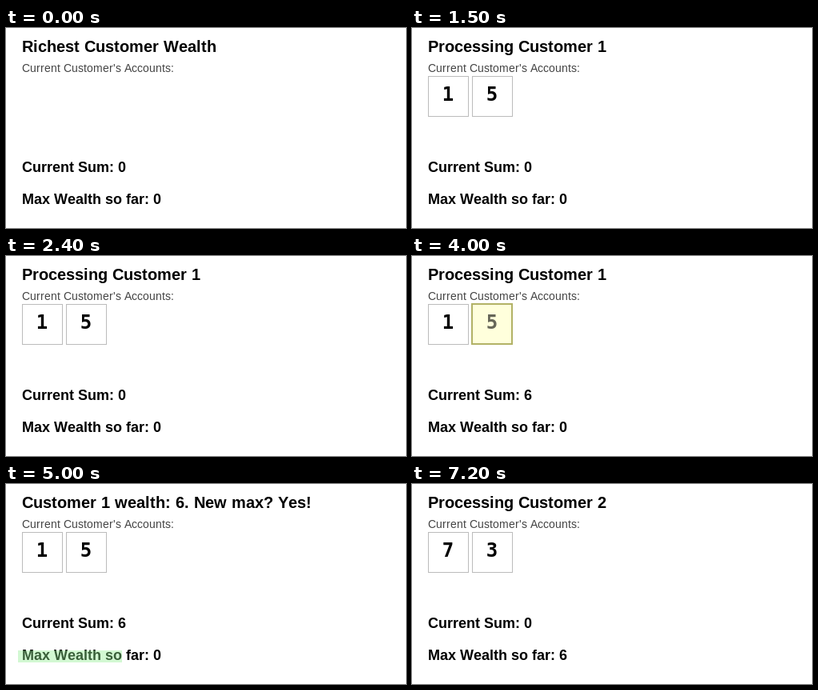
These frames come from a looping animation (500x250 px, 8 s). An HTML page with a canvas:

```html
<!DOCTYPE html>
<html lang="en">
<head>
<meta charset="utf-8">
<title>Richest Customer Wealth</title>
<style>
  html, body { margin: 0; width: 100%; height: 100%; overflow: hidden; background: #fff; }
  canvas { display: block; }
</style>
</head>
<body>
<canvas id="stage" width="500" height="250"></canvas>
<script>
const ctx = document.getElementById('stage').getContext('2d');
const LOOP = 8000;
const SANS = '"Liberation Sans", Arial, sans-serif';
const MONO = '"DejaVu Sans Mono", monospace';

const GREY = { fill: '#fff', stroke: '#aaa', ink: '#666' };
const YELLOW = { fill: '#ffffdc', stroke: '#b2b266', ink: '#666658' };

// Each step holds until the next one starts.
const steps = [
  { at: 0, title: 'Richest Customer Wealth', accounts: [], sum: 0, max: 0 },
  { at: 1500, title: 'Processing Customer 1', accounts: [1, 5], sum: 0, max: 0 },
  { at: 3000, title: 'Processing Customer 1', accounts: [1, 5], sum: 1, max: 0, active: 0, look: GREY },
  { at: 4000, title: 'Processing Customer 1', accounts: [1, 5], sum: 6, max: 0, active: 1, look: YELLOW },
  { at: 5000, title: 'Customer 1 wealth: 6. New max? Yes!', accounts: [1, 5], sum: 6, max: 0, newMax: true },
  { at: 6000, title: 'Processing Customer 2', accounts: [7, 3], sum: 0, max: 6 }
];

// Sets text on whole-pixel advances.
function write(text, y, font, color = '#000') {
  ctx.font = `${font} ${SANS}`;
  ctx.fillStyle = color;
  ctx.textAlign = 'left';
  let x = 20;
  for (const ch of text) {
    ctx.fillText(ch, x, y);
    x += Math.round(ctx.measureText(ch).width);
  }
}

function drawAccount(value, index, look) {
  const x = 20 + index * 55, y = 60;
  const offset = look ? 0 : 0.5;
  if (look) {
    ctx.fillStyle = look.fill;
    ctx.fillRect(x, y, 50, 50);
  }
  ctx.lineWidth = look ? 2 : 1;
  ctx.strokeStyle = look ? look.stroke : '#bbb';
  ctx.strokeRect(x + offset, y + offset, 50, 50);

  ctx.font = `bold 24px ${MONO}`;
  ctx.fillStyle = look ? look.ink : '#000';
  ctx.textAlign = 'center';
  ctx.fillText(value, x + 25, y + 31);
}

function draw(time) {
  const step = steps.findLast(s => s.at <= time);
  ctx.fillStyle = '#fff';
  ctx.fillRect(0, 0, 500, 250);

  write(step.title, 30, 'bold 20px');
  write("Current Customer's Accounts:", 55, '14px', '#444');
  step.accounts.forEach((value, i) => drawAccount(value, i, i === step.active ? step.look : null));
  write(`Current Sum: ${step.sum}`, 180, 'bold 18px');
  write(`Max Wealth so far: ${step.max}`, 220, 'bold 18px');

  if (step.newMax) {
    ctx.fillStyle = 'rgba(144, 238, 144, 0.4)';
    ctx.fillRect(15, 208, 130, 15);
  }
}

const start = performance.now();
function tick() {
  draw((performance.now() - start) % LOOP);
  requestAnimationFrame(tick);
}
tick();
</script>
</body>
</html>
```
